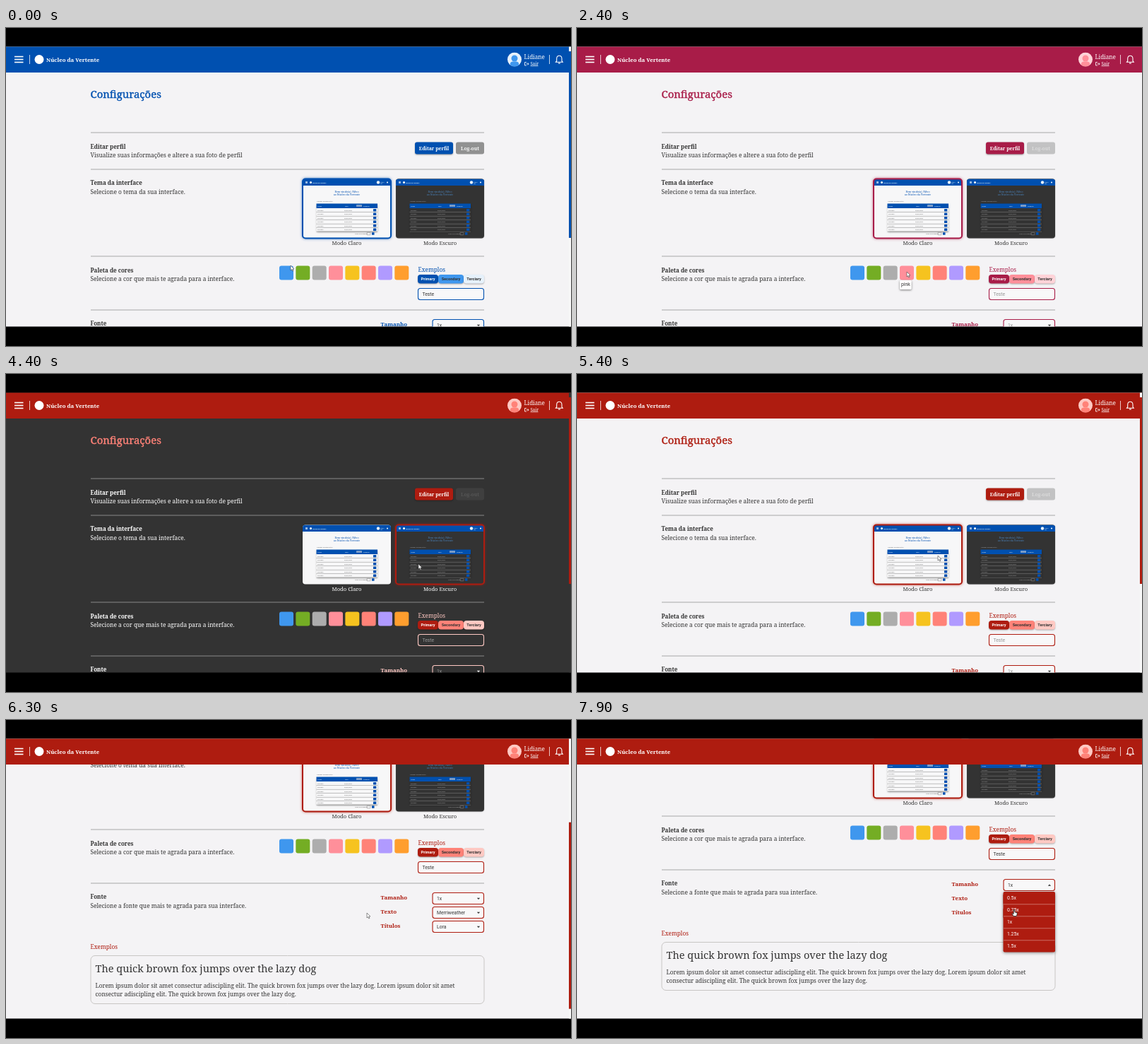
Recreate the animation shown at these times as an HTML page with a canvas. Size 800x450 px, loop 8 s.

```html
<!DOCTYPE html>
<html lang="pt-BR">
<head>
<meta charset="utf-8">
<title>Configurações</title>
<style>
  html, body { margin: 0; width: 100%; height: 100%; overflow: hidden; background: #000; }
  canvas { display: block; width: 800px; height: 450px; }
</style>
</head>
<body>
<canvas id="stage" width="800" height="450"></canvas>
<script>
const ctx = document.getElementById('stage').getContext('2d');
const SERIF = '"Noto Serif", serif';
const SANS = 'Roboto, sans-serif';
const LOOP = 8000;
const STEP = 100;
const PAGE_TOP = 26.4;
const PAGE_HEIGHT = 396.2;
const SITE = 'Núcleo da Vertente';
const USER = 'Lidiane';

const palettes = {
  blue:   { primary: '#0050b0', secondary: '#3f97ee', tertiary: '#e6f1fb' },
  green:  { primary: '#375a19', secondary: '#74ad24', tertiary: '#daf0a0' },
  gray:   { primary: '#555555', secondary: '#adadad', tertiary: '#e4e4e4' },
  pink:   { primary: '#a81c48', secondary: '#ff8f9a', tertiary: '#ffd3d8' },
  yellow: { primary: '#884d0f', secondary: '#f6c31f', tertiary: '#ffe98e' },
  red:    { primary: '#ae1c10', secondary: '#ff8278', tertiary: '#ffc9c3' },
  purple: { primary: '#5a35b5', secondary: '#b09aff', tertiary: '#e3dbff' },
  orange: { primary: '#9c4a00', secondary: '#ff9e2e', tertiary: '#ffdcb0' }
};
const swatches = Object.keys(palettes);
const swatchX = i => 387 + 23.33 * i;

// [time, palette, dark mode]
const themes = [
  [0, 'blue', false], [600, 'green', false], [1600, 'gray', false],
  [2400, 'pink', false], [3000, 'yellow', false], [3600, 'red', false],
  [4400, 'red', true], [5400, 'red', false]
];

// [time, x, y] of the pointer tip
const pointerPath = [
  [0, 403, 336], [500, 418, 342], [900, 420, 343], [1300, 442, 345],
  [1800, 443, 345], [2200, 467, 345], [2400, 467, 345], [2600, 490, 345],
  [3000, 490, 345], [3400, 516, 342], [3600, 516, 342], [4000, 584, 269],
  [4500, 584, 269], [5000, 511, 257], [5700, 511, 257], [6100, 511, 273],
  [6500, 511, 273], [7000, 640, 232], [7200, 640, 232], [7900, 619, 268]
];
const MENU_OPEN = 7100;

const clamp = v => Math.max(0, Math.min(1, v));
const ease = v => v * v * (3 - 2 * v);

function pointerAt(t) {
  let i = 0;
  while (i < pointerPath.length - 2 && pointerPath[i + 1][0] <= t) i++;
  const [t0, x0, y0] = pointerPath[i], [t1, x1, y1] = pointerPath[i + 1];
  const k = ease(clamp((t - t0) / (t1 - t0)));
  return { x: x0 + (x1 - x0) * k, y: y0 + (y1 - y0) * k };
}

function scrollAt(t) {
  return Math.round(187 * ease(clamp((t - 5700) / 750)));
}

function rect(x, y, w, h, color) {
  ctx.fillStyle = color;
  ctx.fillRect(x, y, w, h);
}

function round(x, y, w, h, r, fill, stroke, line = 1) {
  ctx.beginPath();
  ctx.roundRect(x, y, w, h, r);
  if (fill) { ctx.fillStyle = fill; ctx.fill(); }
  if (stroke) { ctx.strokeStyle = stroke; ctx.lineWidth = line; ctx.stroke(); }
}

function circle(x, y, r, color) {
  ctx.beginPath();
  ctx.arc(x, y, r, 0, Math.PI * 2);
  ctx.fillStyle = color;
  ctx.fill();
}

function path(points, color, fill, line = 1) {
  ctx.beginPath();
  points.forEach(([x, y]) => ctx.lineTo(x, y));
  if (fill) { ctx.closePath(); ctx.fillStyle = fill; ctx.fill(); }
  if (color) { ctx.strokeStyle = color; ctx.lineWidth = line; ctx.stroke(); }
}

function text(str, x, y, size, color, { bold = false, family = SERIF, align = 'left' } = {}) {
  ctx.font = `${bold ? 'bold ' : ''}${size}px ${family}`;
  ctx.textAlign = align;
  ctx.fillStyle = color;
  ctx.fillText(str, x, y);
}

function withShadow(blur, color, draw, dy = 1) {
  ctx.save();
  ctx.shadowBlur = blur;
  ctx.shadowColor = color;
  ctx.shadowOffsetY = dy;
  draw();
  ctx.restore();
}

function withAlpha(alpha, draw) {
  ctx.save();
  ctx.globalAlpha *= alpha;
  draw();
  ctx.restore();
}

function avatar(x, y, r, back, front) {
  ctx.save();
  ctx.beginPath();
  ctx.arc(x, y, r, 0, Math.PI * 2);
  ctx.clip();
  rect(x - r, y - r, 2 * r, 2 * r, back);
  circle(x, y - r * 0.15, r * 0.45, front);
  round(x - r * 0.62, y + r * 0.3, r * 1.24, r, r * 0.4, front);
  ctx.restore();
}

function thumbnail(x, dark, selected, accent) {
  const y = 213.5, w = 125, h = 84, blue = '#0050b0';
  const paper = dark ? '#333333' : '#f7f7f8';
  const ink = dark ? '#aaaaaa' : '#666666';
  const heading = dark ? '#4a83bd' : blue;
  const mid = x + w / 2;
  withShadow(selected ? 4 : 2, selected ? accent : 'rgba(0,0,0,.3)',
    () => round(x, y, w, h, 4, paper), 0);

  ctx.save();
  ctx.beginPath();
  ctx.roundRect(x, y, w, h, 4);
  ctx.clip();
  rect(x, y, w, 9.5, blue);
  for (let i = 0; i < 3; i++) rect(x + 4, y + 3.5 + i * 1.2, 3, 0.6, '#fff');
  circle(x + 11.5, y + 5, 1.5, '#fff');
  text(SITE, x + 14, y + 6, 2, '#fff', { bold: true });
  circle(x + 107, y + 5, 2.2, '#e6f1fb');
  text('Nilvo', x + 110, y + 5, 2.2, '#fff');
  text('Sair', x + 110, y + 7, 1.7, '#fff');
  circle(x + 120, y + 5, 1, '#fff');

  text('Bem vindo(a), Nilvo', mid, y + 19, 3.6, heading, { align: 'center' });
  text('ao ' + SITE, mid, y + 23.5, 3.6, heading, { align: 'center' });
  text('Últimas atualizações', x + 20, y + 32.8, 2.3, ink);

  withShadow(3, 'rgba(0,0,0,.45)', () => rect(x + 19.5, y + 35, 86.5, 39, paper));
  rect(x + 19.5, y + 35, 86.5, 6.5, blue);
  text('Nome', x + 21, y + 39, 2.2, '#fff');
  text('Tipo', x + 60, y + 39, 2.2, '#fff');
  round(x + 76, y + 36.6, 8, 3, 0.5, '#7b9cc8');
  text('Situação', x + 86, y + 39, 2.2, '#fff');
  for (let i = 0; i < 6; i++) {
    const row = y + 44.3 + i * 5.5;
    text('Reunião', x + 21, row + 0.7, 2.2, ink);
    text('00/00/0000', x + 59, row + 0.7, 2.2, ink);
    round(x + 100, row - 1.8, 4.3, 3.5, 0.6, blue);
    rect(x + 19.5, row + 2.6, 86.5, 0.6, dark ? '#777' : '#999');
  }
  text('Itens por página', x + 74, y + 78.5, 2.3, ink);
  round(x + 91, y + 75.8, 5, 3.5, 0.4, null, ink, 0.4);
  round(x + 98, y + 75.8, 3.5, 3.5, 0.4, blue);
  ctx.restore();

  if (selected) round(x, y, w, h, 4, null, accent, 2);
}

function caret(x, y, dir, color) {
  path([[x - 2.2, y - dir], [x + 2.2, y - dir], [x, y + dir * 1.2]], null, color);
}

function drawContent(s) {
  const { colors, dark, age } = s;
  const ink = dark ? '#ffffff' : '#333333';
  const title = dark ? colors.secondary : colors.primary;
  const label = dark ? colors.tertiary : colors.primary;
  const settle = clamp(0.5 + age / 400);
  const heading = (str, y) => text(str, 119.5, y, 8, ink, { bold: true });
  const body = (str, y, x = 119.5) => text(str, x, y, 8.33, ink);

  text('Configurações', 119.5, 98.8, 14.9, title);
  ctx.strokeStyle = title;
  ctx.lineWidth = 0.35;
  ctx.strokeText('Configurações', 119.5, 98.8);

  [147.5, 199.5, 322.5, 398.5].forEach(y => rect(120, y, 557, 1, dark ? '#8a8a8a' : '#a8a8a8'));

  heading('Editar perfil', 170.5);
  body('Visualize suas informações e altere a sua foto de perfil', 183.2);
  withShadow(2, 'rgba(0,0,0,.35)', () => round(579, 161.5, 54, 17, 3, colors.primary));
  text('Editar perfil', 606, 172.5, 6.8, '#fff', { bold: true, align: 'center' });
  const fade = clamp((dark ? 0.12 : 0.5) + age / 300);
  withAlpha(fade, () => {
    round(637, 161.5, 40, 17, 3, '#919191');
    text('Log-out', 657, 172.5, 6.8, '#f4f4f4', { bold: true, align: 'center' });
  });

  heading('Tema da interface', 222.3);
  body('Selecione o tema da sua interface.', 235);
  thumbnail(420, false, !dark, colors.primary);
  thumbnail(552, true, dark, colors.primary);
  text('Modo Claro', 482.5, 306.5, 7.6, ink, { align: 'center' });
  text('Modo Escuro', 614.5, 306.5, 7.6, ink, { align: 'center' });

  heading('Paleta de cores', 345.5);
  body('Selecione a cor que mais te agrada para a interface.', 358);
  swatches.forEach((name, i) =>
    round(swatchX(i), 336.5, 20, 20, 3, palettes[name].secondary));

  text('Exemplos', 583.5, 345.3, 8.3, label);
  [['Primary', 583, 29, colors.primary, '#fff'],
   ['Secondary', 612, 36, colors.secondary, '#333'],
   ['Terciary', 648, 29, colors.tertiary, '#333']].forEach(([name, x, w, fill, color]) => {
    withShadow(2, 'rgba(0,0,0,.3)', () => round(x, 349, w, 12.5, 4, fill));
    text(name, x + w / 2, 357.2, 5.6, color, { bold: true, family: SANS, align: 'center' });
  });

  const field = (x, y, w, value) => {
    round(x, y, w, 16, 3, dark ? null : '#f8f8f9', label, 1.1);
    withAlpha(settle, () => text(value, x + 6, y + 10.5, 6.8, ink, { family: SANS }));
  };
  field(583.5, 368.5, 93, 'Teste');

  heading('Fonte', 421);
  body('Selecione a fonte que mais te agrada para sua interface.', 434);
  [['Tamanho', '1x'], ['Texto', 'Merriweather'], ['Títulos', 'Lora']].forEach(([name, value], i) => {
    const y = 412.5 + i * 20;
    text(name, 530.5, y + 9, 7.9, label, { bold: true });
    field(604, y, 72.5, value);
    caret(669, y + 8.3, s.menu > 0 && i === 0 ? -1 : 1, ink);
  });

  text('Exemplos', 119.5, 491.5, 8.3, label);
  round(120, 501.5, 557, 68, 6, null, dark ? '#888' : '#c8c6c4');
  text('The quick brown fox jumps over the lazy dog', 126.5, 525, 14.55, ink);
  const fox = 'The quick brown fox jumps over the lazy dog.';
  body(`Lorem ipsum dolor sit amet consectur adiscipling elit. ${fox} Lorem ipsum dolor sit amet`, 546.5, 126.5);
  body(`consectur adiscipling elit. ${fox}`, 558.8, 126.5);
}

function drawHeader({ colors }) {
  rect(0, 26, 800, 37, colors.primary);
  for (let i = 0; i < 3; i++) rect(12, 39.7 + i * 4, 12.5, 1.6, '#fff');
  rect(33, 38, 1, 13, 'rgba(255,255,255,.75)');
  circle(47, 44.5, 6.5, '#fff');
  text(SITE, 57, 47.5, 7.8, '#fff', { bold: true });

  avatar(720, 44.5, 10, colors.tertiary, colors.secondary);
  text(USER, 733.5, 44.3, 8.1, '#fff');
  path([[737, 48.5], [734.5, 48.5], [734.5, 53], [737, 53]], '#fff', null, 0.8);
  path([[736.5, 50.8], [740, 50.8]], '#fff', null, 0.8);
  path([[738.5, 49.2], [740.2, 50.8], [738.5, 52.4]], '#fff', null, 0.8);
  text('Sair', 742.5, 52.8, 6.2, '#fff');
  rect(742.5, 53.6, 11, 0.6, '#fff');
  rect(769, 38, 1, 13, 'rgba(255,255,255,.75)');

  ctx.beginPath();
  ctx.moveTo(778.5, 48.2);
  ctx.lineTo(779.7, 46.7);
  ctx.lineTo(779.7, 43.5);
  ctx.bezierCurveTo(779.7, 37.8, 787, 37.8, 787, 43.5);
  ctx.lineTo(787, 46.7);
  ctx.lineTo(788.2, 48.2);
  ctx.closePath();
  ctx.strokeStyle = '#fff';
  ctx.lineWidth = 1.1;
  ctx.stroke();
  rect(782, 49.3, 2.8, 1.2, '#fff');
}

function drawScrollbar({ colors, dark, scroll }) {
  rect(797, 26, 3, 397, dark ? '#333333' : '#f8f8f8');
  rect(797, 33 + scroll * 0.665, 3, 264, colors.primary);
}

function drawTooltip(index) {
  const name = swatches[index], x = swatchX(index);
  ctx.font = `6.8px ${SANS}`;
  const w = ctx.measureText(name).width + 4;
  withShadow(3, 'rgba(0,0,0,.5)', () => round(x, 357, w, 13, 1.5, '#fff'));
  text(name, x + 2, 365.3, 6.8, '#333', { family: SANS });
}

function drawMenu({ colors, menu, scroll }) {
  const top = 430 - scroll;
  withAlpha(menu, () => {
    withShadow(4, 'rgba(0,0,0,.45)', () => round(603.5, top, 73.5, 85.5, 2, colors.primary));
    ['0.5x', '0.75x', '1x', '1.25x', '1.5x'].forEach((size, i) => {
      text(size, 609, top + 11.2 + i * 17, 6.8, '#fff', { family: SANS });
      if (i) rect(604, top + i * 17 + 0.5, 72.5, 0.7, 'rgba(255,255,255,.5)');
    });
  });
}

function drawPointer({ x, y }, hand) {
  ctx.save();
  ctx.translate(x, y);
  ctx.lineJoin = 'round';
  if (hand) {
    path([[-0.8, 0.5], [0.8, 0.5], [0.8, 3.8], [4.2, 4.7], [4, 7.5], [3, 9.5],
          [-1, 9.5], [-3, 6], [-2.2, 5.4], [-0.8, 6.5]], '#222', '#fff', 0.8);
  } else {
    path([[0, 0], [0, 7], [1.6, 5.6], [2.7, 8], [3.9, 7.5], [2.8, 5.1], [4.9, 5], [0, 0]],
      '#444', '#fff', 0.6);
  }
  ctx.restore();
}

function stateAt(t) {
  const [since, name, dark] = themes.filter(([start]) => start <= t).pop();
  const pointer = pointerAt(t), scroll = scrollAt(t);
  const hovered = scroll || pointer.y < 336.5 || pointer.y > 356.5 ? -1
    : swatches.findIndex((_, i) => pointer.x >= swatchX(i) && pointer.x <= swatchX(i) + 20);
  return {
    colors: palettes[name], dark, pointer, scroll, hovered,
    age: since ? t - since : LOOP,
    menu: t < MENU_OPEN ? 0 : clamp((t - MENU_OPEN + 100) / 250)
  };
}

function draw(t) {
  const s = stateAt(t);
  rect(0, 0, 800, 450, '#000');
  ctx.save();
  ctx.beginPath();
  ctx.rect(0, PAGE_TOP, 800, PAGE_HEIGHT);
  ctx.clip();
  rect(0, 26, 800, 397, s.dark ? '#333333' : '#f4f3f5');

  ctx.save();
  ctx.translate(0, -s.scroll);
  drawContent(s);
  ctx.restore();

  drawHeader(s);
  // An open popover locks the page and hides the scrollbar.
  if (s.hovered < 0 && !s.menu) drawScrollbar(s);
  if (s.hovered >= 0) drawTooltip(s.hovered);
  if (s.menu) drawMenu(s);
  drawPointer(s.pointer, s.menu > 0);
  ctx.restore();
}

const started = performance.now();
function frame() {
  const t = (performance.now() - started) % LOOP;
  draw(Math.floor(t / STEP) * STEP);
  requestAnimationFrame(frame);
}
frame();
</script>
</body>
</html>
```
